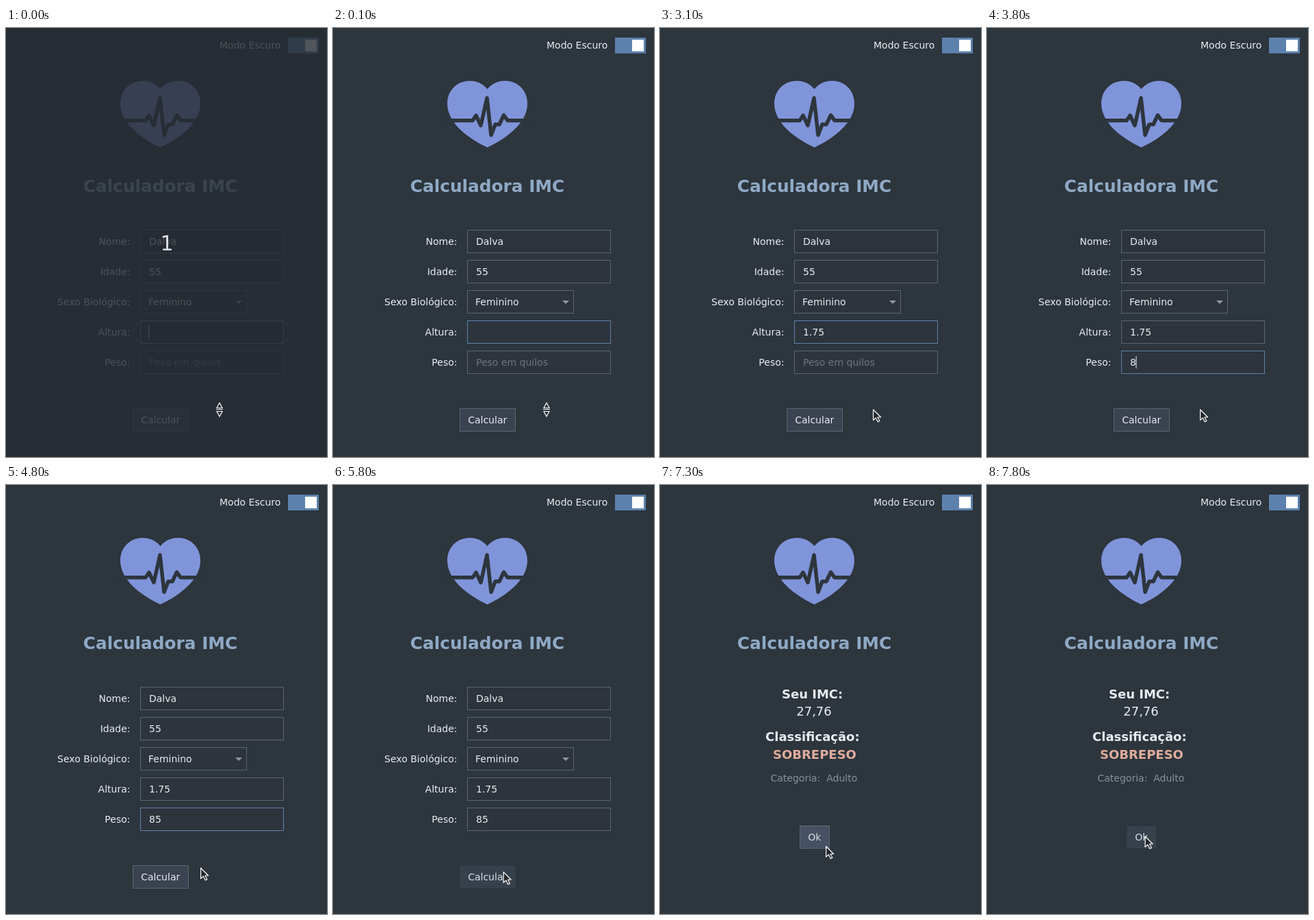
These frames come from a looping animation (469 px wide and 625 px high, 8000 ms). An HTML page:

```html
<!DOCTYPE html>
<html lang="pt">
<head>
<meta charset="utf-8">
<title>Calculadora IMC</title>
<style>
  html, body { margin: 0; width: 100%; height: 100%; overflow: hidden; background: #2d353d; }
  svg { display: block; }
  text { font: 14px "DejaVu Sans", sans-serif; fill: #e9edf2; white-space: pre; }
  .title { font-size: 24.8px; font-weight: bold; fill: #8fa9c5; }
  .big { font-size: 18px; }
  .bold { font-weight: bold; }
  .end { text-anchor: end; }
  .mid { text-anchor: middle; }
  .field { fill: #2d343c; stroke: #5c6670; }
  .field.focus { stroke: #5e81ac; }
  .hint { fill: #6d7680; }
  .button rect { fill: #3b4250; stroke: #5a6672; }
  .button.hover rect { fill: #465163; }
  .button.pressed rect { fill: #37414c; stroke: none; }
  .hover text, .pressed text { fill: #d8dee6; }
</style>
</head>
<body>
<svg width="469" height="625" viewBox="0 0 469 625">
  <rect width="469" height="625" fill="#2d353d"/>
  <text x="312" y="30">Modo Escuro</text>
  <rect x="412" y="14" width="45" height="23" fill="#5c81ac"/>
  <rect x="437" y="17" width="17" height="17" fill="#fff"/>

  <path fill="#8094da" d="M225.5 89C219 81 210 77 200 77C181 77 167 91 167 110C167 138 196 160 225.5 174C255 160 284 138 284 110C284 91 270 77 251 77C241 77 232 81 225.5 89Z"/>
  <path fill="none" stroke="#2d353d" stroke-width="5.5" stroke-linejoin="round" d="M164 134.7H204L209 127.5L216 142L225 102L231 156L237 140.5H243L249.5 127L255 134.7H287"/>
  <text class="title mid" x="225.5" y="238.5">Calculadora IMC</text>

  <g id="form">
    <text class="end" x="181.5" y="316">Nome:</text>
    <text class="end" x="181.5" y="360">Idade:</text>
    <text class="end" x="181.5" y="404">Sexo Biológico:</text>
    <text class="end" x="181.5" y="448">Altura:</text>
    <text class="end" x="181.5" y="492">Peso:</text>
    <rect class="field" x="196.5" y="294.5" width="209" height="33"/>
    <rect class="field" x="196.5" y="338.5" width="209" height="33"/>
    <rect class="field" x="196.5" y="382.5" width="155" height="33"/>
    <rect class="field" id="heightBox" x="196.5" y="426.5" width="209" height="33"/>
    <rect class="field" id="weightBox" x="196.5" y="470.5" width="209" height="33"/>
    <path fill="#8c98a5" d="M335 397H345L340 402Z"/>
    <text x="209" y="316">Dalva</text>
    <text x="209" y="360">55</text>
    <text x="208" y="404">Feminino</text>
    <text id="heightText" x="209" y="448"></text>
    <text id="weightText" x="209" y="492"></text>
    <rect id="caret" width="1" height="18" fill="#e9edf2"/>
    <g id="calc" class="button">
      <rect x="185.5" y="554.5" width="81" height="33"/>
      <text class="mid" x="225.7" y="576">Calcular</text>
    </g>
  </g>

  <g id="result">
    <text class="big bold" x="178" y="311">Seu IMC:</text>
    <text class="big mid" x="225" y="336">27,76</text>
    <text class="big bold" x="154" y="373">Classificação:</text>
    <text class="big bold" x="165" y="399" style="fill:#e0ac9b">SOBREPESO</text>
    <text x="161.5" y="432" style="fill:#89929c">Categoria:  Adulto</text>
    <g id="ok" class="button">
      <rect x="204.5" y="496.5" width="43" height="33"/>
      <text class="mid" x="225.7" y="518">Ok</text>
    </g>
  </g>

  <g id="countdown">
    <rect width="469" height="625" fill="#262b32" fill-opacity=".8"/>
    <text class="mid" x="235" y="324" style="font-size:30px;fill:#dcdfe3">1</text>
  </g>
  <path id="resize" fill="none" stroke="#fff" stroke-width="1.2" d="M312 546L316 553.5H308ZM307 555.5H317M308 558.5H316L312 566Z"/>
  <path id="arrow" fill="#23262a" stroke="#fff" stroke-width="1.2" stroke-linejoin="round" d="M.6 1V16.4L4.3 13L7.2 18.8L9.8 17.6L7 12H11.6Z"/>
</svg>
<script>
  const LOOP = 8000;
  const $ = id => document.getElementById(id);
  const show = (id, on) => $(id).style.display = on ? "" : "none";

  // Each track holds [start time, value...] and jumps at each time.
  const heightTyped = [[0, ""], [1300, "1"], [2200, "1."], [2400, "1.7"], [2600, "1.75"]];
  const weightTyped = [[0, ""], [3800, "8"], [4000, "85"]];
  const caretOn = [[0, 1], [100, 0], [600, 1], [1100, 0], [1300, 1], [1800, 0], [2200, 1],
    [3100, 0], [3200, 1], [3700, 0], [3800, 1], [4500, 0], [5000, 1], [5500, 0]];
  const pointer = [[0, 311, 555], [4700, 303, 555], [4800, 284, 557], [4900, 265, 560],
    [5000, 254, 562], [5100, 248, 562], [5400, 248.5, 563], [7000, 251, 564], [7100, 250, 554],
    [7200, 246, 539], [7300, 242, 525.5], [7400, 237, 518], [7500, 233, 513], [7600, 230.5, 511]];
  const at = (track, t) => track.filter(key => key[0] <= t).pop();

  const textWidth = text => [...text].reduce((w, c) => w + (c === "." ? 4 : 9), 0);

  function setButton(id, hover, pressed) {
    $(id).setAttribute("class", "button" + (pressed ? " pressed" : hover ? " hover" : ""));
  }

  function draw(now) {
    const t = now % LOOP;
    const [, x, y] = at(pointer, t);
    const tall = at(heightTyped, t)[1];
    const heavy = at(weightTyped, t)[1];
    const onWeight = t >= 3200;

    show("countdown", t < 100);
    show("resize", t < 200);
    show("arrow", t >= 200);
    show("form", t < 6000);
    show("result", t >= 6000);
    $("arrow").setAttribute("transform", `translate(${x} ${y})`);

    $("heightText").textContent = tall;
    $("weightText").textContent = heavy || (onWeight ? "" : "Peso em quilos");
    $("weightText").classList.toggle("hint", !onWeight);
    $("heightBox").classList.toggle("focus", !onWeight);
    $("weightBox").classList.toggle("focus", onWeight && t < 5800);

    show("caret", at(caretOn, t)[1]);
    $("caret").setAttribute("x", 208.5 + textWidth(onWeight ? heavy : tall));
    $("caret").setAttribute("y", onWeight ? 478 : 434);

    setButton("calc", x < 267, t >= 5700);
    setButton("ok", y < 530, t >= 7800);
  }

  const start = performance.now();
  function tick() {
    draw(performance.now() - start);
    requestAnimationFrame(tick);
  }
  tick();
</script>
</body>
</html>
```
